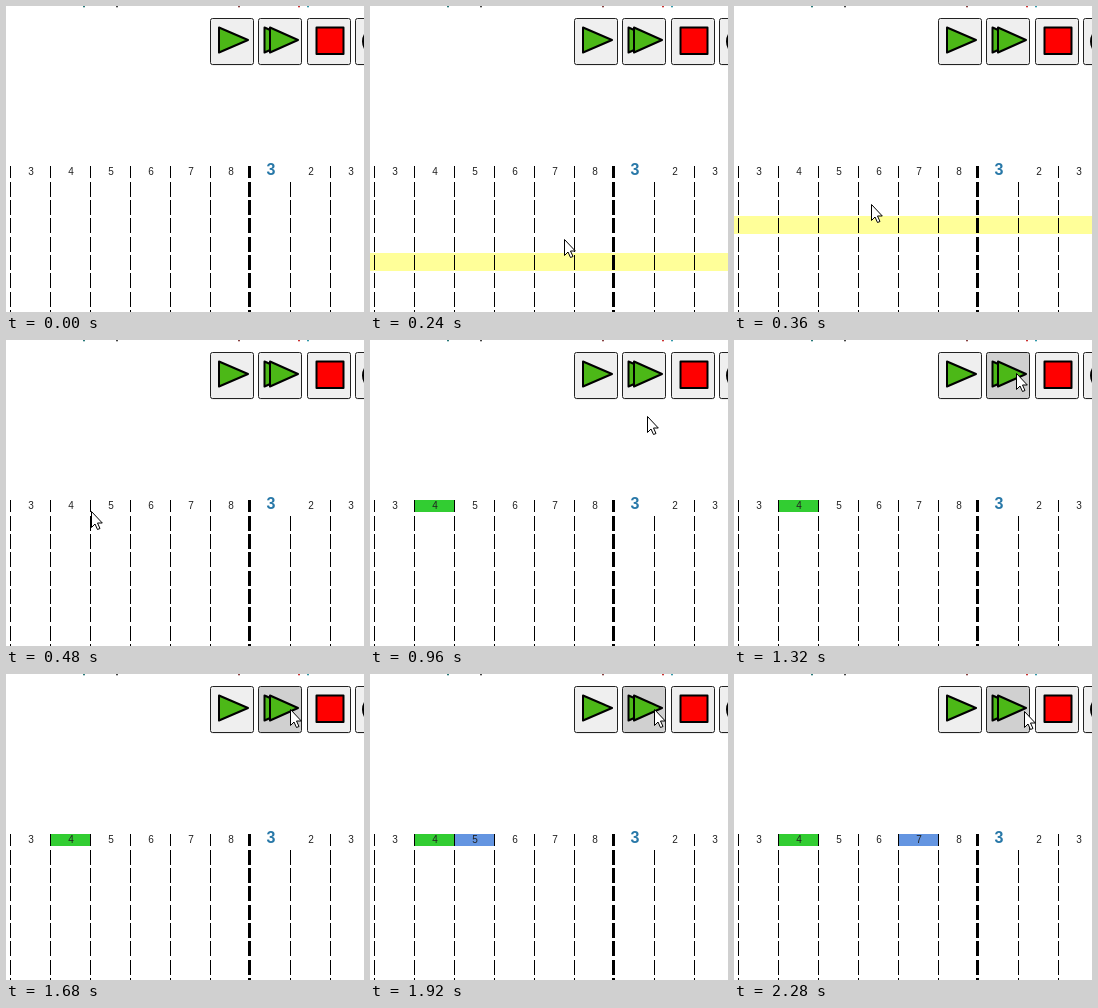
Animation, 358 px wide and 306 px high, one loop 2.4 s. Source, as an HTML page:

```html
<!DOCTYPE html>
<html lang="en">
<head>
<meta charset="utf-8">
<title>Beat grid</title>
<style>
  html, body { margin: 0; width: 100%; height: 100%; overflow: hidden; background: #fff; }
  svg { display: block; }
  text { font: 10px Arial, "Liberation Sans", sans-serif; text-anchor: middle; fill: #222; }
  .bar { font-size: 16px; font-weight: bold; fill: #2878a8; }
  .button { fill: #efefef; stroke: #222; }
  .button.hover { fill: #d0d0d0; }
  .icon { stroke: #000; stroke-width: 2; stroke-linejoin: round; }
  .play { fill: #4cb817; }
</style>
</head>
<body>
<svg width="358" height="306" viewBox="0 0 358 306">
  <g id="scraps"></g>
  <g id="buttons"></g>
  <g class="icon">
    <path class="play" d="M213 21.5L242 34L213 46.5Z"/>
    <path class="play" d="M258.500 21.500L287 34L258.500 46.500Z"/>
    <path class="play" d="M264 21.500L292 34L264 46.500Z"/>
    <rect x="310.500" y="21.500" width="27" height="26.500" fill="red"/>
    <circle cx="371" cy="35.500" r="14" fill="none"/>
  </g>
  <rect id="row" x="0" width="358" height="18" fill="#ff9"/>
  <rect id="picked" x="45" y="160" width="39" height="12" fill="#32cd32"/>
  <rect id="playing" y="160" width="39" height="12" fill="#6495e1"/>
  <g id="grid" shape-rendering="crispEdges"></g>
  <path id="cursor" d="M.5 .5V16.500L4 13L6.500 18.500L9 17.500L6.500 12H11.300Z" fill="#fff" stroke="#000"/>
</svg>
<script>
const $ = id => document.getElementById(id);
const STEP = 120, STEPS = 20, PITCH = 18.35;

function add(parent, tag, attrs, text = '') {
  const el = document.createElementNS('http://www.w3.org/2000/svg', tag);
  for (const key in attrs) el.setAttribute(key, attrs[key]);
  el.textContent = text;
  return $(parent).appendChild(el);
}

// Descenders of the line of text cut off by the top edge
[[77, '#287878'], [110, '#444'], [232, '#844'], [292, '#c33'], [301, '#39a']].forEach(([x, fill]) =>
  add('scraps', 'rect', { x, y: 0, width: 2, height: 1.3, fill }));

const buttons = [204, 252, 301, 349].map(x => {
  add('buttons', 'rect', { x: x + 0.5, y: 13.5, width: 43, height: 46, rx: 2, fill: '#ddd' });
  return add('buttons', 'rect', { x: x + 0.5, y: 12.5, width: 43, height: 46, rx: 2, class: 'button' });
});

const rowTop = i => Math.round(173.5 + i * PITCH);

for (let c = 0; c < 9; c++) {
  const thick = c === 6;
  const x = thick ? 242 : 4 + c * 40, width = thick ? 3 : 1;
  if (c !== 7) add('grid', 'rect', { x, y: 160, width, height: 12 });
  for (let r = 0; r < 8; r++)
    add('grid', 'rect', { x, y: rowTop(r) + 2, width, height: 15 });
  add('grid', 'text', { x: 25 + c * 40, y: 169, class: thick ? 'bar' : '' }, thick ? 3 : (c + 2) % 8 + 1);
}

// Pointer waypoints: step, x, y
const path = [
  [1, 240, 287], [2, 194, 233], [3, 137, 198], [4, 85, 171], [5, 69, 164],
  [6, 71, 164], [7, 182, 119], [8, 277, 76], [9, 309, 44], [10, 307, 36],
  [11, 282, 33], [12, 282, 34], [13, 283, 34], [14, 284, 35], [17, 284, 35],
  [18, 287, 36], [19, 290, 37]
];

function pointer(step) {
  const i = Math.max(1, path.findIndex(p => p[0] >= step));
  const [a, ax, ay] = path[i - 1], [b, bx, by] = path[i];
  const k = (step - a) / (b - a);
  return [Math.round(ax + (bx - ax) * k), Math.round(ay + (by - ay) * k)];
}

function show(el, on) {
  el.style.display = on ? '' : 'none';
}

function draw(now) {
  const step = Math.floor(now / STEP) % STEPS;
  const [x, y] = pointer(step);

  show($('cursor'), step > 0);
  $('cursor').setAttribute('transform', `translate(${x} ${y})`);

  // The row highlight trails one row below the pointer
  show($('row'), step > 0 && step < 4);
  $('row').setAttribute('y', rowTop(Math.floor((y - 173.5) / PITCH) + 1));

  show($('picked'), step >= 6);
  show($('playing'), step >= 16);
  $('playing').setAttribute('x', 85 + 40 * Math.max(0, step - 17));

  buttons[2].classList.toggle('hover', step === 9 || step === 10);
  buttons[1].classList.toggle('hover', step >= 11);
}

const start = performance.now();
(function loop() {
  draw(performance.now() - start);
  requestAnimationFrame(loop);
})();
</script>
</body>
</html>
```
